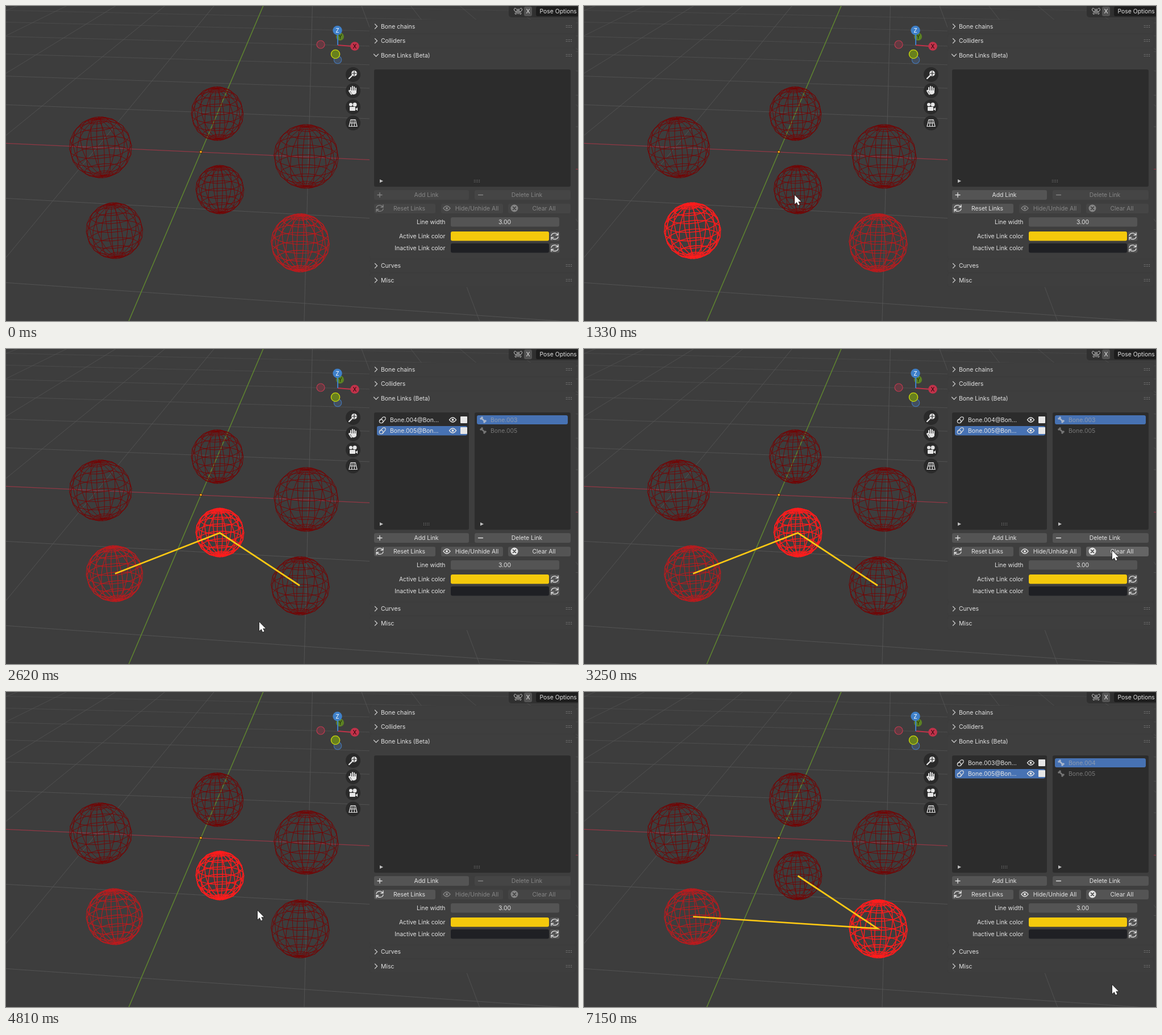
Animation of 1007 by 556 pixels, one loop 7200 ms. Source, as an HTML page with a canvas:

```html
<!DOCTYPE html>
<html lang="en">
<head>
<meta charset="utf-8">
<title>Bone links</title>
<style>
html, body { margin: 0; height: 100%; overflow: hidden; background: #3d3d3d; }
canvas { display: block; }
</style>
</head>
<body>
<canvas id="stage" width="1007" height="556"></canvas>
<script>
const ctx = document.getElementById('stage').getContext('2d');
const LOOP = 7200, START = 130, STEP = 30;
const TEXT = '#e3e3e3', DIM = '#858585';

// Pointer path: time, x, y
const PATH = [
  [130, 585, 545], [400, 520, 440], [850, 237, 420], [1000, 212, 405],
  [1330, 371, 334], [1390, 371, 334], [1600, 731, 345], [1690, 745, 335],
  [1750, 745, 335], [2180, 446, 482], [2620, 446, 482], [2710, 438, 484],
  [3250, 930, 356], [3380, 930, 356], [3850, 280, 465], [3970, 240, 445],
  [4090, 222, 430], [4210, 205, 415], [4480, 385, 335], [4540, 385, 335],
  [4810, 443, 386], [5020, 510, 456], [5560, 763, 330], [5790, 765, 329],
  [6920, 765, 329], [7150, 930, 517]
];

// Selection of [left, middle, right]: 0 idle, 1 selected, 2 active; then the link target
const STATES = [
  [0, [0, 0, 1], ''], [400, [0, 0, 2], ''], [1000, [2, 0, 1], ''],
  [1390, [1, 2, 1], ''], [1720, [1, 2, 0], 'middle'], [3400, [1, 2, 0], ''],
  [4210, [2, 0, 0], ''], [4520, [1, 2, 0], ''], [5020, [1, 1, 2], ''],
  [5620, [1, 0, 2], 'right']
];
const LOOKS = [['#740404', 0.9], ['#bd1a1d', 1.1], ['#ff1c1c', 1.4]];

function line(color, width, ...pts) {
  ctx.strokeStyle = color;
  ctx.lineWidth = width;
  ctx.beginPath();
  pts.forEach(([x, y]) => ctx.lineTo(x, y));
  ctx.stroke();
}

function box(x, y, w, h, color, r = 3) {
  ctx.fillStyle = color;
  ctx.beginPath();
  ctx.roundRect(x, y, w, h, r);
  ctx.fill();
}

function disc(x, y, r, fill, edge, width = 1.2) {
  ctx.beginPath();
  ctx.arc(x, y, r, 0, 7);
  if (fill) { ctx.fillStyle = fill; ctx.fill(); }
  if (edge) { ctx.strokeStyle = edge; ctx.lineWidth = width; ctx.stroke(); }
}

function text(s, x, y, color = TEXT, align = 'left', font = '10.4px') {
  ctx.font = font + ' Inter, sans-serif';
  ctx.textAlign = align;
  ctx.textBaseline = 'alphabetic';
  ctx.fillStyle = color;
  ctx.fillText(s, x, y + 3.8);
}

function icon(d, x, y, color = TEXT, filled = false, width = 1.3) {
  ctx.save();
  ctx.translate(x, y);
  ctx.fillStyle = ctx.strokeStyle = color;
  ctx.lineWidth = width;
  ctx.lineCap = 'round';
  const p = new Path2D(d);
  if (filled) ctx.fill(p); else ctx.stroke(p);
  ctx.restore();
}

const REFRESH = 'M-6-1A6 5 0 0 1 5-3M6-6V-2H2M6 1A6 5 0 0 1-5 3M-6 6V2H-2';
const PLUS = 'M-4 0H4M0-4V4', MINUS = 'M-4 0H4', CROSS = 'M-2.5-2.5L2.5 2.5M2.5-2.5L-2.5 2.5';

function eye(x, y, color) {
  icon('M-6 0Q0-8 6 0Q0 8-6 0Z', x, y, color);
  disc(x, y, 2, color);
}

function grip(x, y) {
  for (let i = 0; i < 8; i++) {
    ctx.fillStyle = '#a0a0a0';
    ctx.fillRect(x - 5 + (i % 4) * 3, y - 2 + (i >> 2) * 3, 1, 1);
  }
}

// Perspective of the ground grid
function ground(u, v) {
  const w = 1 - 0.01775 * u + 0.171 * v;
  return [(343 + 180 * u + 93.2 * v) / w, (258 + 3.85 * u - 37.1 * v) / w];
}

function drawGround() {
  for (let v = -2; v <= 7; v++)
    if (v) line(`rgba(88,88,88,${0.85 - Math.max(v, 0) * 0.07})`, 1, ground(-14, v), ground(14, v));
  for (let u = -9; u <= 7; u++)
    if (u) line(`rgba(88,88,88,${0.85 - Math.abs(u) * 0.06})`, 1, ground(u, -4), ground(u, 9));
  line('#923845', 1.2, ground(-8, 0), ground(8, 0));
  line('#5f8530', 1.5, ground(0, -4), ground(0, 9));
}

function sphere(x, y, rx, ry, look) {
  const [color, width] = LOOKS[look];
  const tilt = 0.37, roll = (500 - x) * 0.0003, SEG = 16, RINGS = 10;
  const at = (i, j) => {
    const a = i / SEG * 2 * Math.PI + 0.12, b = j / RINGS * Math.PI;
    const px = Math.sin(b) * Math.cos(a), pz = Math.sin(b) * Math.sin(a);
    const py = -Math.cos(b) * Math.cos(tilt) + pz * Math.sin(tilt);
    return [x + rx * (px * Math.cos(roll) + py * Math.sin(roll)),
            y + ry * (py * Math.cos(roll) - px * Math.sin(roll))];
  };
  const range = n => [...Array(n + 1).keys()];
  for (let i = 0; i < SEG; i++) line(color, width, ...range(RINGS).map(j => at(i, j)));
  for (let j = 1; j < RINGS; j++) line(color, width, ...range(SEG).map(i => at(i, j)));
}

function drawGizmo() {
  disc(584, 95, 6.7, '#434f60', '#4473ad');
  disc(588, 54, 7, '#5c8123');
  text('Y', 588.5, 54, '#1c2a08', 'center', '10px');
  line('#bf3349', 2, [584, 69], [608, 71]);
  line('#3f7fc6', 2, [584, 69], [584, 50]);
  disc(554, 68, 7, '#633a41', '#c23a50');
  disc(614, 71, 7.8, '#c2324a');
  text('X', 614, 71, '#1c0509', 'center', '10px');
  disc(583.5, 43, 8.2, '#3f80c9');
  text('Z', 583.5, 43, '#fff', 'center', '10px');
  disc(580, 85, 7.6, '#68801d', '#c9d80c', 1.4);

  for (const y of [121, 149.5, 178, 206.5]) disc(611, y, 13, '#2a2a2a');
  disc(613, 119, 5, '#e6e6e6');
  icon('M-3 3L-8 8', 612, 120, '#e6e6e6', false, 2.4);
  icon(PLUS, 613, 119, '#2a2a2a', false, 1.2);
  icon('M-3 7L-7 1Q-7-1-4 1V-5M-4 1V-5M-1 0V-7M2 0V-6M5 1V-4', 611, 149, '#e6e6e6', false, 2);
  icon('M-4 0H6V4Q4 8-1 7Q-4 5-4 0Z', 611, 149, '#e6e6e6', true);
  disc(607, 174, 3, '#e6e6e6');
  disc(614, 174, 3.5, '#e6e6e6');
  box(605, 178, 10, 7, '#e6e6e6', 1);
  icon('M4 4L8 1V7Z', 611, 178, '#e6e6e6', true);
  icon('M-4-6H4L7 6H-7ZM-5.5 0H5.5M-1.5-6L-2.5 6M1.5-6L2.5 6', 611, 206.5, '#e6e6e6', false, 1.2);
}

function drawTopBar() {
  box(885, -6, 130, 26, '#303030', 5);
  icon('M0-4V5M-2-3Q-7-8-7-2Q-6 1-3 1Q-7 4-4 6Q-2 5-2 1ZM2-3Q7-8 7-2Q6 1 3 1Q7 4 4 6Q2 5 2 1Z',
    901.5, 9, '#c4c4c4', false, 1);
  box(912, 1, 14, 17, '#545454');
  text('X', 919, 9.5, TEXT, 'center');
  box(933, 1, 80, 17, '#1d1d1d');
  text('Pose Options', 939.5, 9.5);
}

function button(label, center, x, y, w, on, pointer) {
  const [px, py] = pointer;
  const hover = on && px >= x && px < x + w && py >= y && py < y + 17;
  const color = on ? TEXT : DIM;
  box(x, y, w, 17, hover ? '#656565' : on ? '#545454' : '#454545');
  text(label, center, y + 8.5, color, 'center');
  return color;
}

function drawLists(target) {
  if (!target) {
    box(648, 112, 346, 207, '#2c2c2c');
    grip(829, 309);
    icon('M-3-3L3 0L-3 3Z', 661, 309, '#c0c0c0', true);
    return;
  }
  box(648, 112, 167, 207, '#2c2c2c');
  box(825, 112, 169, 207, '#2c2c2c');
  for (const x of [661, 838]) icon('M-3-3L3 0L-3 3Z', x, 309, '#c0c0c0', true);
  grip(740, 309);
  box(653, 136, 159, 16.5, '#4772b3');
  box(829, 117, 160, 16, '#4772b3');
  const other = target === 'middle' ? '004' : '003';
  const goal = target === 'middle' ? '003' : '004';
  [other, '005'].forEach((id, i) => {
    const y = 125 + i * 19;
    icon('M-5 1L1-5Q6-6 5-1L0 5', 663, y, '#dcdcdc', false, 1.2);
    disc(660.5, y + 2.5, 3.2, null, '#dcdcdc');
    text(`Bone.${id}@Bon...`, 676, y);
    eye(786.5, y, TEXT);
    box(800, y - 6, 12, 12, '#e6e6e6', 1);
  });
  [goal, '005'].forEach((id, i) => {
    const y = 125 + i * 19, color = i ? '#777' : '#a9b6cb';
    line(color, 2.5, [837, y - 3], [843, y + 3]);
    for (const [dx, dy] of [[-4, -2], [-2, -4], [4, 2], [2, 4]]) disc(840 + dx, y + dy, 1.8, color);
    text(`Bone.${id}`, 853, y, i ? '#777' : '#8d9aae');
  });
}

function drawPanel(t, target, pointer) {
  box(640, 24, 363, 472, '#3c3c3c', 0);
  for (const [y, h] of [[25, 23], [50, 23], [75, 371], [447, 23], [472, 23]])
    box(641, y, 361, h, '#3e3e3e', 4);
  [['Bone chains', 36], ['Colliders', 61.5], ['Bone Links (Beta)', 87], ['Curves', 458.5], ['Misc', 484]]
    .forEach(([label, y], i) => {
      icon(i === 2 ? 'M-4-2L0 2L4-2' : 'M-2-4L2 0L-2 4', 651.5, y, '#c8c8c8');
      text(label, 660, y);
      grip(991, y | 0);
    });
  drawLists(target);

  const ready = t >= 400, linked = !!target;
  let c = button('Add Link', 740, 648, 325, 167, ready, pointer);
  icon(PLUS, 658, 333.5, c);
  c = button('Delete Link', 917, 825, 325, 169, linked, pointer);
  icon(MINUS, 835.5, 333.5, c);
  c = button('Reset Links', 710, 648, 349, 108, ready, pointer);
  icon(REFRESH, 658, 357, c);
  c = button('Hide/Unhide All', 829, 766, 349, 109, linked, pointer);
  eye(776, 357, c);
  c = button('Clear All', 947, 884, 349, 110, linked, pointer);
  disc(895, 357, 6.5, c);
  icon(CROSS, 895, 357, '#3c3c3c', false, 1.6);

  text('Line width', 773.5, 381, TEXT, 'right');
  box(783, 373, 191, 16.5, '#545454');
  text('3.00', 878, 381, TEXT, 'center');
  [['Active Link color', 398, '#f4c90c'], ['Inactive Link color', 419, '#1f2024']].forEach(([label, y, color]) => {
    text(label, 773.5, y + 8.5, TEXT, 'right');
    box(783, y, 173, 16.5, color);
    box(957.5, y, 17, 16.5, '#545454');
    icon(REFRESH, 966, y + 8.3);
  });
}

function pointerAt(t) {
  const i = PATH.findIndex(k => k[0] >= t);
  if (t < START || i < 0) return [-99, -99];
  const b = PATH[i], a = PATH[Math.max(i - 1, 0)];
  const k = (t - a[0]) / (b[0] - a[0] || 1), e = k * k * (3 - 2 * k);
  return [a[1] + (b[1] - a[1]) * e, a[2] + (b[2] - a[2]) * e];
}

function drawPointer([x, y]) {
  const d = 'M0 0V15.5L3.6 12.2L6 17.5L8.6 16.3L6.2 11.2H11Z';
  icon(d, x, y, '#222', false, 1.4);
  icon(d, x, y, '#fff', true);
}

function draw(now) {
  let t = now % LOOP;
  t = t < START ? 0 : START + STEP * Math.floor((t - START) / STEP);
  const [, [left, middle, right], target] = STATES.findLast(s => s[0] <= t);
  const pointer = pointerAt(t);

  ctx.fillStyle = '#3d3d3d';
  ctx.fillRect(0, 0, 1007, 556);
  drawGround();
  sphere(166.5, 249.5, 55, 54, 0);
  sphere(372, 190, 46, 47.5, 0);
  sphere(528.5, 265.5, 57, 56.5, 0);
  sphere(376.5, 324, 42.5, 43, middle);
  sphere(191, 396.5, 50, 49.5, left);
  sphere(518, 418, 51.5, 51.5, right);
  disc(343, 257.5, 2.4, '#f5a01c', '#33210a', 1);
  if (target) {
    const l = [192, 396.5], m = [376.5, 324.5], r = [517, 417.5];
    line('#fec913', 2.7, l, ...(target === 'middle' ? [m, r] : [r, m]));
  }
  drawGizmo();
  drawTopBar();
  drawPanel(t, target, pointer);
  drawPointer(pointer);
  requestAnimationFrame(draw);
}
requestAnimationFrame(draw);
</script>
</body>
</html>
```
